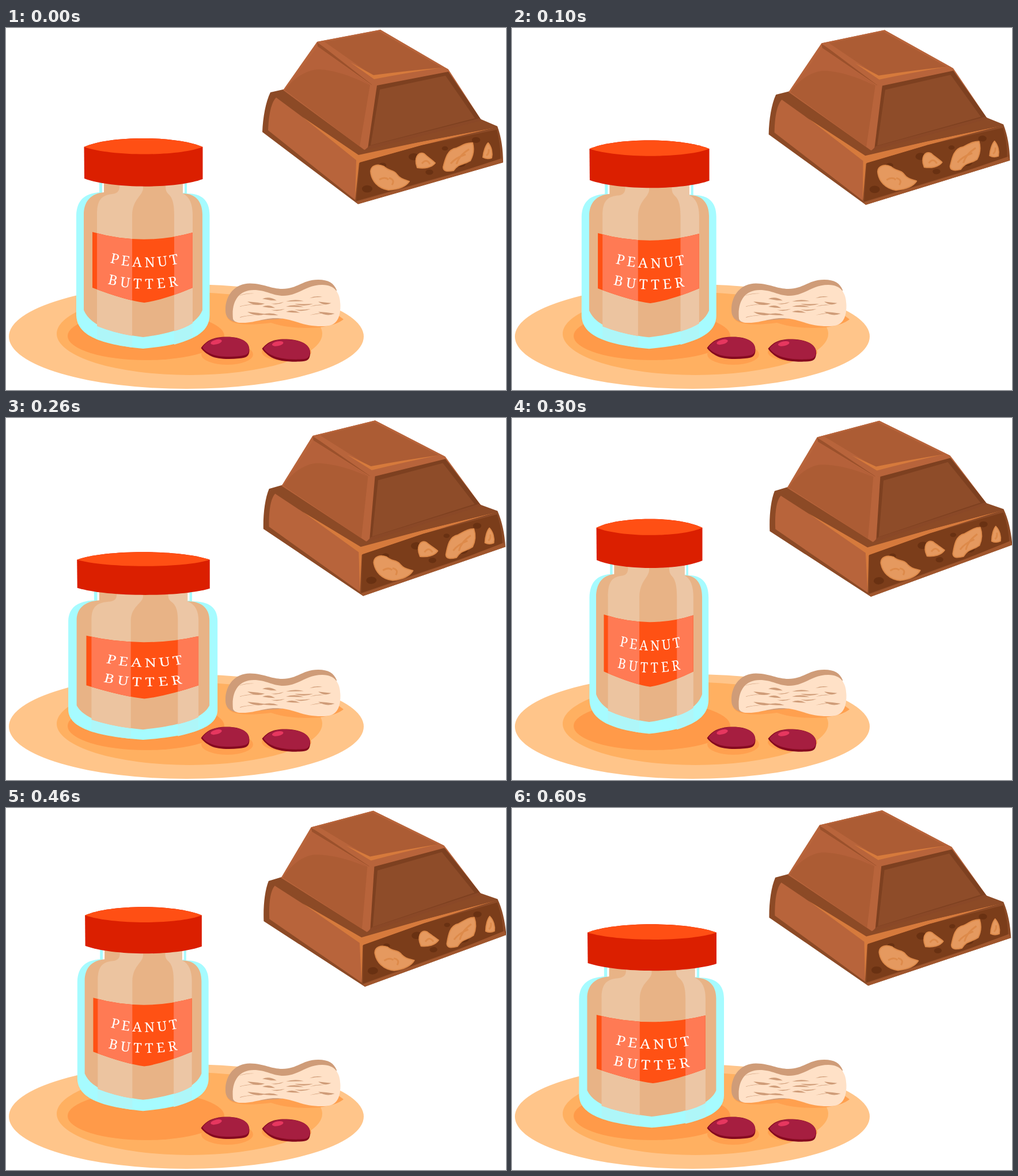
Recreate the animation shown at these times as an HTML page. Size 868x630 px, loop 700 ms.

```html
<!DOCTYPE html>
<html lang="en">
<head>
<meta charset="utf-8">
<title>Peanut butter and chocolate</title>
<style>
html, body { margin: 0; width: 100%; height: 100%; overflow: hidden; background: #fff; }
svg { display: block; width: 868px; height: 630px; }
text { font: 24px "Noto Serif", serif; fill: #fff; }
</style>
</head>
<body>
<svg viewBox="0 0 868 630">
  <defs>
    <path id="label" d="M150 355Q238 380 324 356V452Q275 473 240 478Q208 474 150 452Z"/>
    <clipPath id="labelClip"><use href="#label"/></clipPath>
    <path id="line1" d="M180 408Q243 425 312 407"/>
    <path id="line2" d="M176 445Q240 462 312 446"/>
    <g id="kernel">
      <path fill="#85091f" d="M338.500 557C347 545 358 537.500 384 537.500C408 537.500 422.500 546 422.500 560C422.500 571 418 574 405 575C385 577 366 576 356 571C348 567 342 562 338.500 557Z"/>
      <path fill="#a61e40" d="M341 556C349 545 360 538 384 538C408 538 422 546 422 558C422 567 418 570 405 571C385 573 368 572 358 568C350 565 344 561 341 556Z"/>
      <ellipse cx="365" cy="546.500" rx="10" ry="4" fill="#e6375f" transform="rotate(-15 365 546.500)"/>
    </g>
  </defs>

  <!-- plate and shadows -->
  <ellipse cx="313" cy="537" rx="308" ry="91" fill="#ffc58a"/>
  <ellipse cx="318.500" cy="532" rx="230.500" ry="72" fill="#ffb061"/>
  <ellipse cx="243" cy="536" rx="136" ry="42" fill="#ff9a49"/>
  <g fill="#ffa04f">
    <path d="M383 500C386 518 420 518 460 513C490 524 560 528 586 507L570 495Z"/>
    <ellipse cx="384" cy="568" rx="45" ry="18"/>
    <ellipse cx="487" cy="564" rx="43" ry="16"/>
  </g>

  <!-- peanut -->
  <path fill="#cf9c78" d="M381 492C380 465 398 444 424 444.500C448 445 460 454 480 454C506 454 515 438 542 438C560 438 569 444 574 456L560 500L400 512C387 510 381 502 381 492Z"/>
  <path fill="#ffe1c7" d="M394 506C391 476 404 456 430 456C452 456 462 466 482 466C508 466 520 447 549 447C572 447 580 462 580.500 482C581 506 573 519 552 519C512 520 500 505 468 505C445 505 430 514 408 513C400 513 395 510 394 506Z"/>
  <g id="grain" fill="#cf9c78"></g>

  <use href="#kernel"/>
  <use href="#kernel" transform="translate(106 1) rotate(4 338.500 557)"/>

  <g id="jar">
    <!-- glass -->
    <path fill="#a6fbff" d="M162 258H314V288C340 288 353.500 300 353.500 326V500C353 530 325 550 238 558C152 550 123 530 122 500V326C123 300 136 288 162 286Z"/>
    <path fill="#fff" d="M167 262H310V287H167Z"/>
    <!-- filling -->
    <path fill="#e8b386" d="M170 262H307V288C330 288 341 303 341 325V491C330 520 285 532 238 538C190 532 147 520 135 491V325C135 302 147 288 170 286Z"/>
    <path fill="#ecc4a0" d="M197 264H238V280C236 293 220 298 219 325V536Q185 530 158 519V325C158 303 163 291 184 289Q197 288 197 276Z"/>
    <path fill="#ecc6a5" d="M277 264H307V288C319 294 324 307 324 325V514Q312 522 292 528V325C292 303 288 294 281 288Q277 284 277 276Z"/>
    <g fill="#aef6f8">
      <path d="M158 519Q187 531 219 536V556Q183 551 158 540Z"/>
      <path d="M292 528Q312 522 324 514V539Q310 546 292 551Z"/>
    </g>
    <!-- label -->
    <use href="#label" fill="#ff5114"/>
    <path clip-path="url(#labelClip)" fill="#ff7a54" d="M158 350H219V480H158ZM292 350H324V480H292Z"/>
    <text letter-spacing="5"><textPath href="#line1">PEANUT</textPath></text>
    <text letter-spacing="6.200"><textPath href="#line2">BUTTER</textPath></text>
    <!-- lid -->
    <path fill="#db1f00" d="M135.500 207C180 187 295 187 341.500 207V263C295 280 185 280 136 262Z"/>
    <path fill="#ff4f14" d="M135.500 207C180 187 295 187 341.500 207C300 223.500 185 224 135.500 207Z"/>
  </g>

  <g id="bar">
    <!-- slab -->
    <path fill="#8c4a26" d="M445 181C446 155 451 128 459 112L481 107L650 60L825 159L853 171C860 190 863 212 863 234L611 306.500Z"/>
    <path fill="#b8643b" d="M455 178C456 152 460 130 469 121L611 227L606 299Z"/>
    <path fill="#d67a3c" d="M515 155L612 221L720 198L850 173L722 204L613 235L606 299L608 230Z"/>
    <path fill="#7b3d1a" d="M614 234L722 204L852 177C857 196 859 214 858 230L608 301Z"/>
    <path fill="#a0562d" d="M608 302L780 253L860 227L863 234L611 306.500Z"/>
    <path fill="#8c4a26" d="M480 109L622 213L825 161L852 173L720 198L612 219L472 116Z"/>
    <g id="spots" fill="#693112"></g>
    <!-- nuts -->
    <g fill="#e5995f" stroke="#dd8a4a" stroke-width="2" stroke-linejoin="round">
      <path d="M633 249C634 239 645 236 656 241C665 250 672 246 678 254C684 263 692 264 700 267C694 276 680 281 664 282C646 279 634 266 633 249Z"/>
      <path d="M712 236C710 222 718 215 726 219C732 225 739 229 745 235C739 243 726 245 714 243Z"/>
      <path d="M759 242C763 226 767 211 782 209C791 205 800 199 810 200C813 211 811 222 806 231C793 239 786 235 777 248C767 250 759 250 759 242Z"/>
      <path d="M828 225C829 214 833 204 837 200C843 207 845 218 843 226Q835 229 828 225Z"/>
    </g>
    <path fill="none" stroke="#dd8a4a" stroke-width="3" d="M648 264Q658 258 664 264M665 261Q676 264 670 273M722 236Q730 226 736 237M772 236Q780 226 798 220M782 237Q786 222 804 211M834 222Q839 218 838 211"/>
    <!-- block -->
    <path fill="#b8643b" d="M540 24L650 3L768 72L825 160L622 212L481 108Z"/>
    <path fill="#ac5c34" d="M541 34L632 99L614 206L484 108Z"/>
    <path fill="#b5613a" d="M541 32L632 100C595 80 560 72 541 72C525 73 505 83 491 100Z"/>
    <path fill="#9b512c" d="M540 25L639 92L635 99L541 32Z"/>
    <path fill="#b8643b" d="M540 24L650 3L768 72L637 100Z"/>
    <path fill="#ac5c34" d="M553 24L648 6L757 69Q690 77 638 84Z"/>
    <path fill="#d67a3c" d="M598 60L638 82Q700 74 757 69Q695 78 639 89Z"/>
    <path fill="#7d4020" d="M644 100L768 76L825 160L628 210Z"/>
    <path fill="#8e4c29" d="M649 107L763 83L814 157L633 204Z"/>
    <path fill="#8a4827" d="M631 205L822 157L825 161L622 213Z"/>
  </g>
</svg>
<script>
const el = id => document.getElementById(id);
const repeat = (n, make) => Array.from({ length: n }, (_, i) => make(i)).join("");
const bump = (s, peak, sharp = 2.5) => Math.exp(-sharp * (s - peak) ** 2);
const smooth = x => { x = Math.min(1, Math.max(0, x)); return x * x * (3 - 2 * x); };

// Staggered rows of wisps, pinched at the waist of the shell
el("grain").innerHTML = repeat(20, i => {
  const row = i % 5, col = Math.floor(i / 5);
  const x = 404 + col * 41 + (row % 2) * 15, len = 27 + 5 * Math.sin(i * 7);
  const y = 485 + (row - 2) * (7 + 2.5 * Math.cos((x - 405) / 25));
  const tilt = -4 * Math.cos(i * 3), bend = row % 2 ? 3 : -3;
  return `<path d="M${x} ${y}q${len / 2} ${bend - 2} ${len} ${tilt}q${-len / 2} ${bend + 3} ${-len} ${-tilt}"/>`;
});

// Dark crumbs zigzag along the cut face
el("spots").innerHTML = repeat(8, i => {
  const x = 627 + 27 * i, y = 263 - .27 * (x - 627) + (i % 2 ? -17 : 17);
  const r = 7 + 2 * Math.cos(2 * i);
  return `<ellipse cx="${x}" cy="${y}" rx="${r}" ry="${r * .7}"/>`;
});

const STEP = 100, STEPS = 7;

function draw(now) {
  const s = Math.floor(now / STEP) % STEPS;

  // crouch, stretch, hop, land
  const crouch = bump(s, 2), land = bump(s, 6);
  const wide = 1 + .125 * crouch - .12 * bump(s, 3.1) + .087 * land;
  const tall = 1 - .11 * crouch + .033 * bump(s, 3) - .033 * bump(s, 4) - .033 * land;
  const lift = 32 * bump(s, 4.2, .9) - 2.4 * crouch;
  el("jar").setAttribute("transform",
    `translate(${238.5 + 4.5 * land} ${558 - lift}) scale(${wide} ${tall}) translate(-238.5 -558)`);

  // the bar rocks over and starts back
  const k = smooth(s / 3) * smooth((7.25 - s) / 2.2);
  el("bar").setAttribute("transform",
    `matrix(${1 - .003 * k} ${-.07 * k} ${.08 * k} 1 ${-10.7 * k} ${47.2 * k})`);
}

const start = performance.now();
function loop() {
  draw(performance.now() - start);
  requestAnimationFrame(loop);
}
loop();
</script>
</body>
</html>
```
